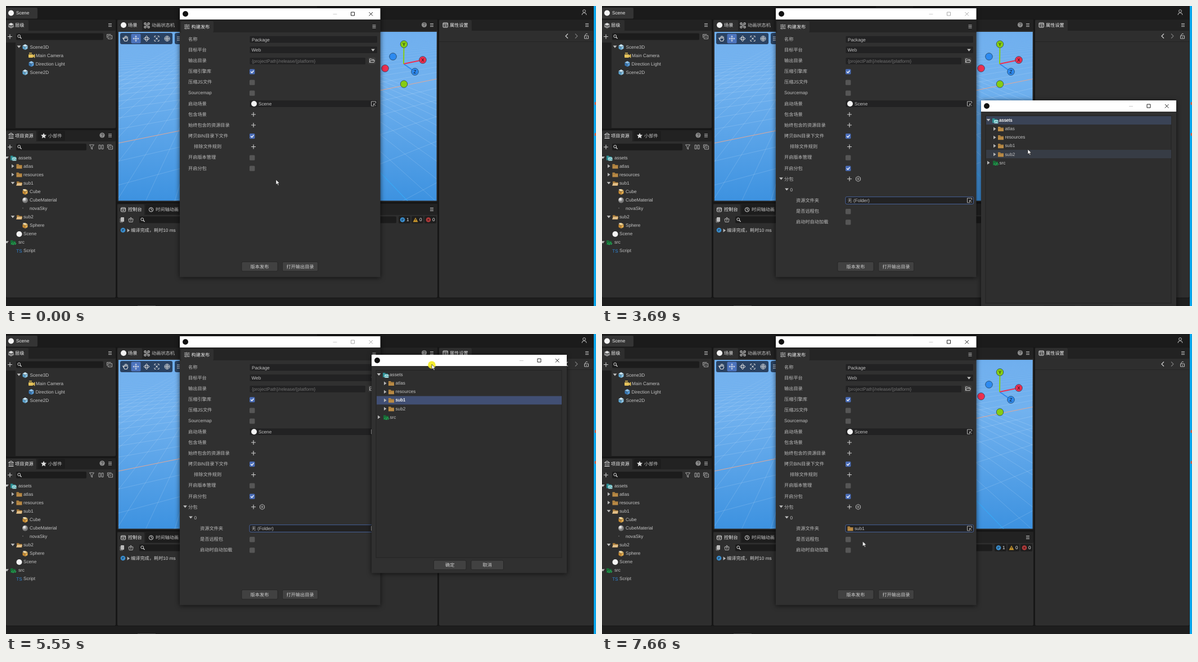
Write an HTML page that moves like this. It is 1049x534 px and loops after 8000 ms.

```html
<!DOCTYPE html>
<html lang="zh">
<head>
<meta charset="utf-8">
<title>Build panel</title>
<style>
html, body { margin: 0; width: 100%; height: 100%; overflow: hidden; background: #191919; }
svg { display: block; width: 100%; height: 100%; }
text { font: 8.2px "Liberation Sans", "Noto Sans CJK SC", "Noto Sans CJK", sans-serif; text-rendering: geometricPrecision; white-space: pre; }
.win { filter: drop-shadow(0 1px 4px #000a); }

/* hard switches */
.idle, .checked, .list, .focus, .active, .inactive, .pick, .rootSel, .subSel, .none, .chosen, .glow, .hover {
  animation: 8s step-end infinite;
}
.checked { animation-name: checked; }
.idle { animation-name: idle; }
.list { animation-name: list; }
.focus { animation-name: focus; }
.active { animation-name: active; }
.inactive, .pick { animation-name: pick; }
.rootSel { animation-name: rootSel; }
.subSel { animation-name: subSel; }
.none { animation-name: none-set; }
.chosen { animation-name: chosen; }
.glow { animation-name: glow; }
.hover { animation-name: hover; }
@keyframes checked { 0% { opacity: 0 } 13.75%, 100% { opacity: 1 } }
@keyframes idle { 0% { opacity: 1 } 13.75%, 100% { opacity: 0 } }
@keyframes list { 0% { opacity: 0 } 21.75%, 100% { opacity: 1 } }
@keyframes focus { 0% { opacity: 0 } 39.1%, 100% { opacity: 1 } }
@keyframes pick { 0% { opacity: 0 } 39.1% { opacity: 1 } 83%, 100% { opacity: 0 } }
@keyframes active { 0% { opacity: 1 } 39.1% { opacity: 0 } 83%, 100% { opacity: 1 } }
@keyframes rootSel { 0% { opacity: 1 } 52.1%, 100% { opacity: 0 } }
@keyframes subSel { 0% { opacity: 0 } 52.1%, 100% { opacity: 1 } }
@keyframes none-set { 0% { opacity: 1 } 83%, 100% { opacity: 0 } }
@keyframes chosen { 0% { opacity: 0 } 83%, 100% { opacity: 1 } }
@keyframes glow {
  0%, 13.75%, 21.75%, 52.1%, 70.4%, 83%, 100% { opacity: 0 }
  11.85%, 19.6%, 50.2%, 63.8%, 81.1% { opacity: .9 }
}
@keyframes hover {
  0%, 52.1%, 61%, 73.5%, 74.4%, 100% { opacity: 0; transform: none }
  45%, 74.1% { opacity: 1; transform: translateY(75px) }
  45.75%, 73.8% { opacity: 1; transform: translateY(60px) }
  47% { opacity: 1; transform: translateY(45px) }
  55.6%, 73.2% { opacity: 1; transform: translateY(30px) }
  57%, 72.8% { opacity: 1; transform: translateY(15px) }
  58.2%, 72.3% { opacity: 1; transform: none }
}

/* motion */
.drag { animation: drag 8s ease-in-out infinite; }
.cursor { animation: cursor 8s ease-in-out infinite; }
@keyframes drag {
  0%, 64.4% { transform: translate(674px, 168px) }
  69.3%, 70.3% { transform: translate(650px, 37px) }
  70.4%, 100% { transform: translate(649.3px, 37px) }
}
@keyframes cursor {
  0%, .4% { transform: translate(480px, 309px) }
  6.9%, 9.6% { transform: translate(442px, 291px) }
  9.75%, 17% { transform: translate(442px, 290px) }
  17.75% { transform: translate(442px, 298px) }
  19.6%, 26% { transform: translate(439px, 307px) }
  36.1%, 37.1% { transform: translate(652px, 346px) }
  37.25%, 42.5% { transform: translate(651px, 346px) }
  46.1% { transform: translate(757px, 255px) }
  47.4%, 52.5% { transform: translate(757px, 249px) }
  59.4%, 61.5% { transform: translate(777px, 195px) }
  63.3%, 64.4% { transform: translate(781px, 185px) }
  69.3%, 71.2% { transform: translate(757px, 54px) }
  80%, 83.5% { transform: translate(800px, 409px) }
  91.8%, 92.5% { transform: translate(488px, 369px) }
  95.75%, 100% { transform: translate(463.5px, 369px) }
}
</style>
</head>
<body>
<script>
const LIGHT = '#c4c4c4', WHITE = '#f0f0f0', BODY = '#2e2e2e', STRIP = '#222', FIELD = '#222223';

// basic shapes; text is placed by its vertical centre
const rect = (x, y, w, h, fill, r = 0, more = '') => `<rect x="${x}" y="${y}" width="${w}" height="${h}" rx="${r}" fill="${fill}" ${more}/>`;
const disc = (x, y, r, fill, more = '') => `<circle cx="${x}" cy="${y}" r="${r}" fill="${fill}" ${more}/>`;
const path = (d, stroke = LIGHT, w = 1, fill = 'none') => `<path d="${d}" stroke="${stroke}" stroke-width="${w}" fill="${fill}"/>`;
const text = (x, y, s, fill = LIGHT, more = '') => `<text x="${x}" y="${y + 2.9}" fill="${fill}" ${more}>${s}</text>`;
const group = (cls, ...parts) => `<g class="${cls}">${parts.join('')}</g>`;
const at = (x, y, ...parts) => `<g transform="translate(${x} ${y})">${parts.join('')}</g>`;
const middle = 'text-anchor="middle"';

// icons, centred on x, y
const right = (x, y) => path(`M${x - 2} ${y - 3.2}l4.6 3.2l-4.6 3.2z`, 'none', 0, '#b4b4b4');
const down = (x, y) => path(`M${x - 3.4} ${y - 2}h6.8l-3.4 4.2z`, 'none', 0, '#c0c0c0');
const menu = (x, y) => path(`M${x - 3} ${y - 2.5}h6m-6 2.5h6m-6 2.5h6`, '#bbb');
const plus = (x, y) => path(`M${x - 4} ${y}h8m-4 -4v8`, '#d0d0d0', 1.1);
const lens = (x, y) => disc(x - .8, y - .8, 2.4, 'none', 'stroke="#ddd"') + path(`M${x + 1} ${y + 1}l2.5 2.5`, '#ddd', 1.2);
const mark = (x, y, fill = '#f4f4f4') => disc(x, y, 5, fill);
const help = (x, y) => disc(x, y, 4.6, '#8c8c8c') + text(x, y, '?', '#222', middle + ' font-weight="bold"');
const stack = (x, y) => path(`M${x - 4.5} ${y + 2}v-6h7M${x - 2.5} ${y - 2}h7v6h-7zm1.8 3h3.4`, '#b4b4b4', .9);
const folder = (x, y) => path(`M${x - 5} ${y + 4}v-8h4l1 1.5h5v6.5z`, 'none', 0, '#b98a45') + path(`M${x - 5} ${y - 1.5}h10`, '#8a6530', .7);
const openFolder = (x, y) => path(`M${x - 4.5} ${y + 4}v-7.5h4l1 1.5h4.5v6z`, 'none', 0, '#a87a38') + path(`M${x - 5.5} ${y + 4}l2 -4.5h9l-1.5 4.5z`, 'none', 0, '#e2c08a');
const assets = (x, y) => path(`M${x - 5} ${y + 4}v-8h4l1 1.5h4v6.5z`, 'none', 0, '#2f8f94') + rect(x - 2, y - 1, 7.5, 6, '#a9dce0', 1) + path(`M${x - 1} ${y + 4}l2.3 -3l1.5 1.6l1 -1l1.5 2.4`, '#2f8f94', 1);
const source = (x, y) => path(`M${x - 5} ${y + 4}v-8h4l1 1.5h4v6.5z`, 'none', 0, '#176b35') + path(`M${x - 1} ${y}l-2 2l2 2m4 -4l2 2l-2 2m-1 -4.5l-2 5`, '#37c46c', .9);
const cube = (x, y, a, b, c) => path(`M${x} ${y - 5}l4.5 2.4l-4.5 2.4l-4.5 -2.4z`, 'none', 0, a) + path(`M${x - 4.5} ${y - 2.2}l4.3 2.4v5l-4.3 -2.4z`, 'none', 0, b) + path(`M${x + 4.5} ${y - 2.2}l-4.3 2.4v5l4.3 -2.4z`, 'none', 0, c);
const skyCube = (x, y) => cube(x, y, '#c9e6f8', '#5ba4d0', '#8cc4e4');
const prefab = (x, y) => cube(x, y, '#f1d089', '#c88a30', '#e0a94d') + path(`M${x - 4} ${y - 4}h4`, '#eee', 1);
const info = (x, y) => disc(x, y, 4.3, '#3a8fd0') + path(`M${x - 2} ${y - 1}h4m-4 2h2.6`, '#16344c', 1);
const picker = (x, y) => path(`M${x + 1} ${y + 4}h-5v-8h8v3M${x + 4} ${y + 4}l-4 -4m0 3v-3h3`, '#bdbdbd', .9);
const box = (y, on) => rect(433, y - 4.6, 9.4, 9.4, on ? '#4a6db8' : '#565656', 1.5) + (on ? path(`M435.2 ${y}l2 2.2l3.2 -4`, '#fff', 1.3) : '');
const field = (x, y, w) => rect(x, y - 6.5, w, 13, FIELD, 2, 'stroke="#383838" stroke-width=".6"');
const button = (x, y, w, s) => rect(x, y, w, 16.5, '#414141', 2, 'stroke="#222" stroke-width=".7"') + text(x + w / 2, y + 8.3, s, '#d0d0d0', middle);
const search = (x, y, w) => rect(x, y - 6, w, 12, '#1c1c1c', 2) + lens(x + 6, y);

// white title bar with window controls
const controls = (w, c) => path(`M${w - 52} 7h6v6h-6zM${w - 20} 7l6.5 6.5m0 -6.5l-6.5 6.5`, c, 1);
const titleBar = w => rect(0, 0, w, 20, '#fff') + mark(10, 10, '#111') + path(`M${w - 84} 10.5h7`, '#ccc');

const panel = (x, y, w, h, tab) => rect(x, y, w, h, BODY, 2) + rect(x, y, w, 20, STRIP, 2) + rect(x, y + 1, tab, 20, BODY, 2);

function shell() {
  return rect(0, 0, 1049, 534, '#171717') + rect(0, 0, 1049, 23, '#1b1b1b') + rect(0, 3, 56, 19.5, '#343434', 2)
    + mark(9, 12.5) + text(18, 12, 'Scene', WHITE)
    + rect(487, 1.5, 66, 1, '#333') + rect(0, 520, 1049, 14, '#1e1e1e') + rect(234, 533, 32, 1, '#444')
    + disc(1028, 9, 2.4, 'none', 'stroke="#bbb"') + path('M1024 16q0 -4 4 -4t4 4', '#bbb')
    + rect(1045, 0, 4, 534, '#0aa5ea') + rect(1046.5, 171, 2.5, 5, '#c5604a') + rect(1046.5, 226, 2.5, 5, '#c5604a');
}

function hierarchy() {
  return panel(0, 24, 195, 193.5, 40) + rect(0, 65, 17, 152, '#1f1f1f')
    + path('M9 30l5 2.5l-5 2.5l-5 -2.5z', 'none', 0, '#ddd') + path('M4 34.5l5 2.5l5 -2.5m-10 2l5 2.5l5 -2.5', '#ddd')
    + text(16, 34, '层级', WHITE) + menu(185, 34) + plus(7, 54.5) + search(18, 54.5, 155) + stack(184, 54.5)
    + down(23, 72.5) + skyCube(34, 73) + text(42.5, 73, 'Scene3D')
    + rect(40, 86, 8, 6, '#e3c15a', 1) + path('M41 84h5m2 5l2.500 -2v4z', '#e3c15a', 1.6) + text(53, 88, 'Main Camera')
    + cube(45, 103, '#8fc2ea', '#3676b4', '#5598d4') + text(52.5, 103, 'Direction Light')
    + skyCube(34, 118) + text(42.5, 118, 'Scene2D');
}

function project() {
  const rows = [
    ['assets', 0, assets, down], ['atlas', 1, folder, right], ['resources', 1, folder, right], ['sub1', 1, openFolder, down],
    ['Cube', 2, prefab], ['CubeMaterial', 2, (x, y) => disc(x, y, 5, 'url(#ball)')], ['novaSky', 2, (x, y) => path(`M${x - 5} ${y - 1}h2`, '#777')],
    ['sub2', 1, openFolder, down], ['Sphere', 2, prefab], ['Scene', 1, mark], ['src', 0, source, down],
    ['Script', 1, (x, y) => text(x, y, 'TS', '#2f86d8', middle + ' font-weight="bold"')]
  ];
  const tree = rows.map(([name, depth, icon, arrow], i) => {
    const y = 270 + i * 15.05, x = 13 + depth * 10.5;
    return (arrow ? arrow(x - 11.5, y) : '') + icon(x, y + .5) + text([22, 31, 42][depth], y, name);
  });
  return panel(0, 221, 195, 298, 54) + rect(57, 222, 48, 18, '#1d1d1d', 2)
    + path('M4.500 229l4.500 -3l4.500 3zm1.500 1.500v4m3 -4v4m3 -4v4m-7.500 1h9', '#ddd') + text(16, 231, '项目资源', WHITE)
    + path('M67 226l1.500 3.200l3.500 .4l-2.600 2.400l.7 3.500l-3.100 -1.700l-3.100 1.700l.7 -3.500l-2.600 -2.400l3.500 -.4z', 'none', 0, '#ddd') + text(75, 231, '小部件')
    + help(171, 230) + menu(185, 230.5) + plus(7, 251) + search(18, 251, 125)
    + path('M148.500 247h8l-3 4v4l-2 -1v-3zM165 247.500h3v7h-3zm5 0h3v7h-3z', '#b4b4b4', .9) + stack(185, 251) + tree.join('');
}

function viewport() {
  let grid = '';
  for (let i = -30; i < 8; i++) if (i) grid += `M200 ${20 + 1792 / (8 - i)}L1316 20`;
  for (let n = -18; n < 11; n++) if (n) grid += `M400 20L${715 + n * 52} 350`;
  const axis = (x, y, c, s = '', line = 0) => (line ? path(`M707 103L${x} ${y}`, c, 2) : '')
    + disc(x, y, 6.3, c, 'stroke="#24435f" stroke-width=".8"') + text(x, y, s, '#111', middle + ' font-weight="bold"');
  return panel(198, 24, 569, 324, 44) + mark(209, 34) + text(217, 34, '场景', WHITE)
    + path('M246 30h3v3h-3zm6 0h3v3h-3zm-6 6h3v3h-3zm6 0h3v3h-3zM249 33l3 3m0 -3l-3 3', '#ddd') + text(259, 34, '动画状态机')
    + help(743.5, 33.5) + menu(757, 34)
    + rect(200, 46, 565.5, 300.5, 'url(#sky)')
    + `<g clip-path="url(#view)"><g opacity=".22">${path(grid, '#fff', .7)}</g>${path('M200 244L770 129', '#e0a898', 1)}${path('M560 186.600L715 348', '#38a8f5', 1.200)}${rect(200, 46, 566, 90, 'url(#haze)')}</g>`
    + rect(203, 48, 93, 20, '#22344f', 3, 'opacity=".88"') + rect(300, 48, 30, 20, '#22344f', 3, 'opacity=".88"') + rect(222.500, 49.500, 17, 17, '#4c73bd', 2)
    + path('M210 59v-4m2 3v-5m2 5v-5m2 5.500v-4m-6 4l-2 -1l3 5h4l2 -4', '#ddd', 1.2)
    + path('M226 58h10m-5 -5v10m-3.500 -6.500l-1.500 1.500l1.500 1.500m7 -3l1.500 1.500l-1.500 1.500m-5 -5l1.500 -1.500l1.500 1.500m-3 7l1.500 1.500l1.500 -1.500', '#eee', .9)
    + '<g fill="none" stroke="#ddd"><ellipse cx="250" cy="58" rx="5" ry="2"/><ellipse cx="250" cy="58" rx="2" ry="5"/></g>'
    + path('M264 56v-2.500h2.500m3 0h2.500v2.500m0 4v2.500h-2.500m-3 0h-2.500v-2.500M266 56l4 4m0 -4l-4 4', '#ddd')
    + disc(286.500, 58, 4.500, 'none', 'stroke="#ddd"') + path('M282 58h9m-4.500 -4.500v9', '#ddd', .8) + rect(284.500, 56, 4, 4, 'none', 0, 'stroke="#ddd" stroke-width=".8"')
    + path('M304 55h6m-6 3h6m-6 3h6', '#ddd')
    + axis(688, 90, '#2d8af0') + axis(674, 111, '#ee2f50') + axis(707.500, 139, '#86cc12')
    + axis(727, 117, '#2d8af0', 'Z', 1) + axis(741, 96, '#ee2f50', 'X', 1) + axis(707.500, 68, '#86cc12', 'Y', 1);
}

function consolePanel() {
  const count = (x, icon, n) => rect(x, 374, 21, 13, '#1e1e1e', 2) + icon + text(x + 14, 380, n, WHITE, 'font-weight="bold"');
  return panel(198, 352, 569, 167, 48) + rect(248, 353, 90, 18, '#1d1d1d', 2)
    + rect(204.500, 359, 8, 7, 'none', 1, 'stroke="#ddd"') + path('M204.500 361h8m-6 2.500h4', '#ddd') + text(217, 362, '控制台', WHITE)
    + disc(258, 362.500, 3.700, 'none', 'stroke="#ddd"') + path('M258 360v2.500l2 1', '#ddd') + text(266, 362, '时间轴动画') + menu(757, 362)
    + rect(204, 376, 6, 8, '#bbb', 1) + path('M203 378v7h5', '#888') + path('M218 379h8l-1 5.500h-6zm2 0l2 -3l2 3m-2 0v4', '#bbb', .9)
    + search(237, 380.500, 457)
    + count(698, info(705, 380.500), 1) + count(721, path('M728 376.500l4.500 8h-9z', 'none', 0, '#c8952b') + path('M728 379v3', '#222'), 0)
    + count(744, disc(751, 380.500, 4.300, '#b03a3a') + path('M749.500 379l3 3m0 -3l-3 3', '#301010'), 0)
    + info(208, 399) + right(217.500, 399.500) + text(222, 399, '编译完成，耗时10 ms', '#d4d4d4');
}

function inspector() {
  return panel(770, 24, 274.500, 495, 58) + rect(777, 30, 8.500, 8, 'none', 1, 'stroke="#ddd"') + path('M777 32h8.500m-7 2.200h1m1 0h3m-5 2h1m1 0h3', '#ddd')
    + text(789, 34, '属性设置', WHITE) + menu(1033, 34) + rect(770, 63, 274.500, 1, '#242424')
    + path('M999 49.500l-4 4l4 4', '#d0d0d0', 1.2) + path('M1012 49.500l4 4l-4 4', '#777', 1.2)
    + path('M1028.500 53h7v5h-7zm1.500 0v-2q2 -3.500 4 -1m-2 5v2', '#bbb');
}

function buildWindow() {
  const rowY = i => 58.800 + i * 19.150;
  const labels = ['名称', '目标平台', '输出目录', '压缩引擎库', '压缩JS文件', 'Sourcemap', '启动场景', '包含场景', '始终包含的资源目录', '拷贝BIN目录下文件', '排除文件规则', '开启版本管理', '开启分包'];
  const [bundle, item, dir, remote, auto] = [13, 14, 15, 16, 17].map(rowY);
  return group('win', rect(309, 4, 356.500, 478.500, '#303030')
    + at(309, 4, titleBar(356.500), group('active', controls(356.500, '#222')), group('inactive', controls(356.500, '#aaa')))
    + rect(309, 24, 356.500, 23, '#252525') + rect(311, 27, 58, 20, '#303030', 2)
    + path('M317 34h3m2.500 0h4m-9.500 3h5m2.500 0h2m-9.500 3h2m2.500 0h5M321 32.500v3m2 0v3m-3 0v3', '#ddd') + text(329.500, 37, '构建发布', WHITE) + menu(654.500, 36.500)
    + labels.map((s, i) => text(i === 10 ? 334 : 324, rowY(i), s, '#bebebe')).join('')
    + field(433, 59.500, 227.500) + text(437, 60, 'Package') + field(433, 78, 227.500) + text(436.500, 78, 'Web') + down(652.500, 78.500)
    + field(433, 98, 206.500) + text(437, 98.500, '{projectPath}/release/{platform}', '#727272') + rect(644, 91.500, 13, 12, '#3c3c3c', 2)
    + path('M646.500 100.500v-6.500h3l1 1.200h3.500v1.800m-7.500 3.500l1.500 -3.500h7.500l-1.500 3.500z', '#ccc', .9)
    + box(116.800, 1) + box(136) + box(155) + field(433, 174, 227.500) + mark(441, 174) + text(449, 174, 'Scene') + picker(653.500, 174)
    + [193, 212, 250.500].map(y => plus(440, y)).join('') + box(231.500, 1) + box(270)
    + group('idle', box(289)) + group('checked', box(289, 1), text(324, bundle, '分包', '#bebebe'), plus(440, 307.800))
    + group('list', down(318.500, bundle - .5), path('M455.500 303.200l4 2.300v4.600l-4 2.300l-4 -2.300v-4.600z', '#bbb'), disc(455.500, 307.800, 1.400, 'none', 'stroke="#bbb"'),
      down(328.500, item - .5), text(334.500, item, '0'), text(345, dir, '资源文件夹', '#bebebe'), text(345, remote, '是否远程包', '#bebebe'), text(345, auto, '启动时自动加载', '#bebebe'),
      field(433, 346, 227.500), group('focus', rect(433, 339.700, 227.500, 12.800, 'none', 2, 'stroke="#4a68a5" stroke-width=".9"')),
      group('none', text(436.500, 346, '无 (Folder)')), group('chosen', folder(441.500, 346.500), text(449, 346, 'sub1')), picker(653.500, 346), box(365.700), box(384.800))
    + button(419, 455.500, 64, '版本发布') + button(491.500, 455.500, 63, '打开输出目录'));
}

function chooser() {
  const rows = ['atlas', 'resources', 'sub1', 'sub2'].map((s, i) => {
    const y = 50.300 + i * 15.100;
    return right(24, y + .5) + folder(35, y + .8) + text(42.500, y, s);
  });
  return group('pick', group('drag', group('win', rect(0, 0, 347, 388.500, '#303030'), titleBar(347), controls(347, '#222'),
    rect(8, 27.500, 330, 333.500, '#2e2e2e', 0, 'stroke="#222"'),
    group('rootSel', rect(9, 28, 329, 15, '#3a4356')), group('subSel', rect(9, 73.500, 329, 15, '#414f74')), group('hover', rect(9, 28, 329, 15, '#373c45')),
    down(13, 35), assets(25, 36), text(32, 35, 'assets'), group('rootSel', text(32, 35, 'assets', '#fff')), rows.join(''),
    group('subSel', text(42.500, 80.500, 'sub1', '#fff')), right(13, 111), source(26, 111.500), text(32.500, 110.700, 'src'),
    button(110.500, 366, 57.500, '确定'), button(177, 366, 57.500, '取消'))));
}

const pointer = group('cursor', group('glow', disc(0, 1, 6.800, '#f4ec1c')),
  path('M0 0v9l2.200 -1.900l1.500 3.400l1.500 -.7l-1.500 -3.200h2.800z', '#222', .7, '#fff'));

const gradient = (id, stops) => `<linearGradient id="${id}" x2="0" y2="1">${stops.map(([o, c, a = 1]) => `<stop offset="${o}" stop-color="${c}" stop-opacity="${a}"/>`).join('')}</linearGradient>`;
const defs = `<defs>${gradient('sky', [[0, '#66a9ec'], [.3, '#72b2ef'], [1, '#3d92e0']])}${gradient('haze', [[0, '#6eaeee'], [1, '#78b6f0', 0]])}
  <radialGradient id="ball" cx=".35" cy=".3"><stop stop-color="#fff"/><stop offset="1" stop-color="#777"/></radialGradient>
  <clipPath id="view">${rect(200, 46, 565.500, 300.500, '#fff')}</clipPath></defs>`;

document.body.innerHTML = `<svg viewBox="0 0 1049 534">${defs}${shell()}${hierarchy()}${project()}${viewport()}${consolePanel()}${inspector()}${buildWindow()}${chooser()}${pointer}</svg>`;
</script>
</body>
</html>
```
